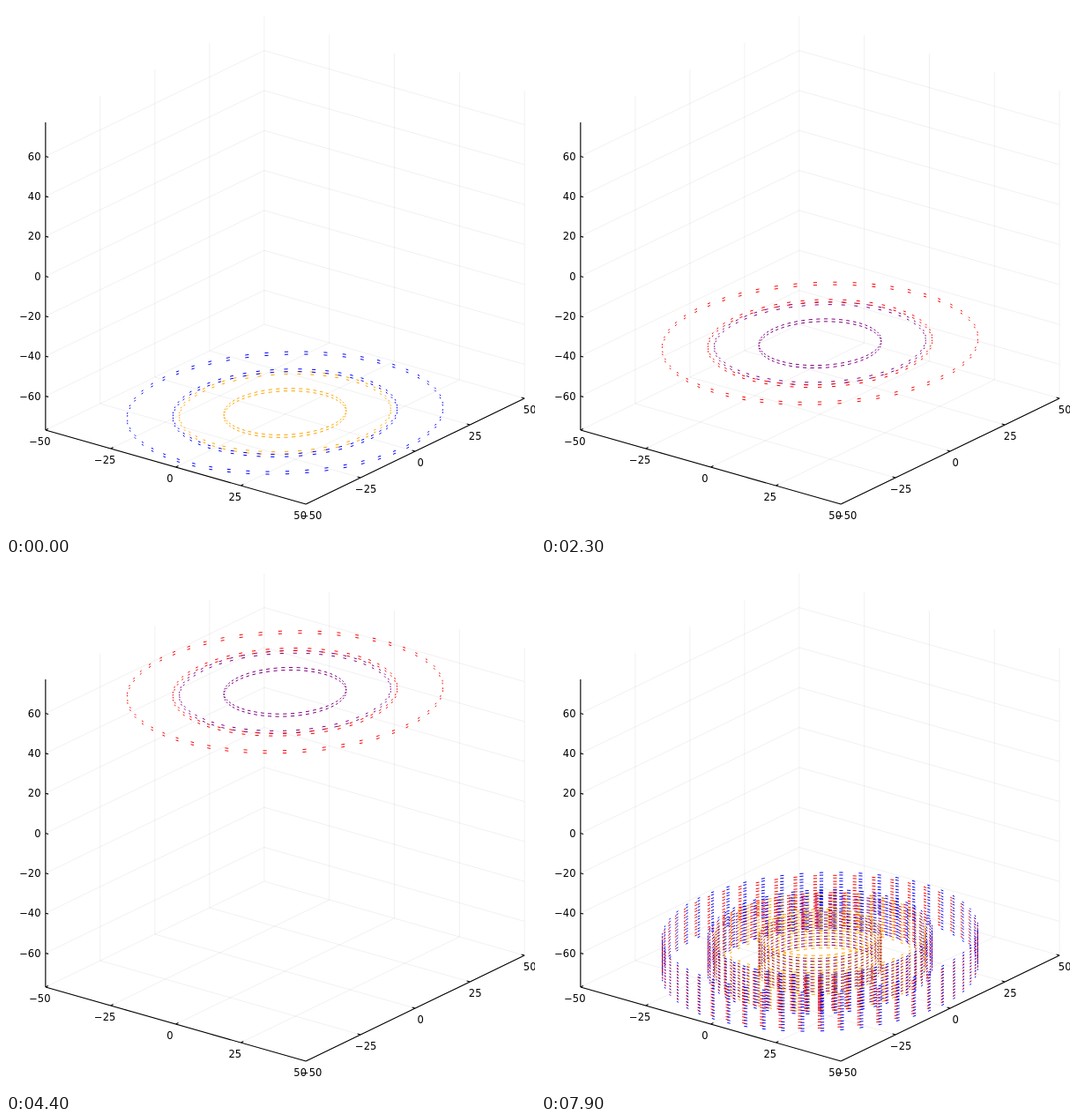
Write an HTML page that moves like this. It is 600x600 px and loops after 8000 ms.

```html
<!DOCTYPE html>
<html lang="en">
<head>
<meta charset="utf-8">
<title>Ring slices</title>
<style>
  html, body { margin: 0; width: 100%; height: 100%; overflow: hidden; background: #fff; }
  svg { display: block; width: 600px; height: 600px; }
  text { font: 11.5px "DejaVu Sans", sans-serif; fill: #000; }
  path { fill: none; }
</style>
</head>
<body>
<svg viewBox="0 0 600 600">
  <path id="grid" stroke="#000" stroke-opacity=".1" stroke-width=".6"/>
  <path id="axes" stroke="#000" stroke-width="1.1"/>
  <g id="labels"></g>
  <g id="rings"></g>
</svg>
<script>
const FRAME_MS = 100, FRAMES = 80, SWEEP = 27;
const COUNT = 50, STEP = 2 * Math.PI / COUNT;
const FLOOR = -77, PITCH = 1.512, HEIGHT = 1.3, WIDTH = 1.1, UPPER_SLICE = 75;
const VIEW = 0.699;
const el = id => document.getElementById(id);

const project = (x, y, z) => [
  316.5 + 2.953 * x + 2.48 * y,
  463 + 0.84 * x - 1.2 * y - 2.266 * (z - FLOOR)
];
const point = (...p) => project(...p).map(v => v.toFixed(2)).join(" ");
const line = (a, b) => `M${point(...a)}L${point(...b)}`;

function drawAxes() {
  let grid = "", axes = "", labels = "";
  const label = (x, y, value, anchor) => {
    labels += `<text x="${x}" y="${y}" text-anchor="${anchor}">${String(value).replace("-", "\u2212")}</text>`;
  };
  for (let v = -50; v <= 50; v += 25) {
    grid += line([v, 50, FLOOR], [v, 50, 77]) + line([v, -50, FLOOR], [v, 50, FLOOR]);
    grid += line([-50, v, FLOOR], [50, v, FLOOR]);
    if (v < 50) grid += line([-50, v, FLOOR], [-50, v, 77]);
    axes += line([v, -50, FLOOR], [v, -48.8, FLOOR]) + line([50, v, FLOOR], [48.8, v, FLOOR]);
    const [px, py] = project(v, -50, FLOOR), [qx, qy] = project(50, v, FLOOR);
    label(px - 6.5, py + 16.5, v, "middle");
    label(qx + 6, qy + 16.5, v, "middle");
  }
  for (let z = -60; z <= 60; z += 20) {
    grid += line([-50, -50, z], [-50, 50, z]) + line([-50, 50, z], [50, 50, z]);
    axes += line([-50, -50, z], [-48.9, -50, z]);
    label(39.5, project(-50, -50, z)[1] + 4.2, z, "end");
  }
  axes += line([-50, -50, 77], [-50, -50, FLOOR]) +
    line([-50, -50, FLOOR], [50, -50, FLOOR]) + line([50, -50, FLOOR], [50, 50, FLOOR]);
  el("grid").setAttribute("d", grid);
  el("axes").setAttribute("d", axes);
  el("labels").innerHTML = labels;
}

// Each element is the bottom and top edge of a small face, tangent to its ring.
function ringPath(radius, z, phase, lean) {
  let d = "";
  for (let k = 0; k < COUNT; k++) {
    const base = STEP * (k + phase);
    const angle = base + lean * STEP * Math.sin(base) + VIEW;
    const c = Math.cos(angle), s = Math.sin(angle), w = WIDTH / 2;
    for (const h of [z, z + HEIGHT])
      d += line([radius * c - w * s, radius * s + w * c, h], [radius * c + w * s, radius * s - w * c, h]);
  }
  return d;
}

const cache = {};
function layer(index, outer, upper) {
  const key = [index, outer, upper].join();
  if (!cache[key]) {
    const odd = index % 2;
    const color = outer ? (odd ? "#f00" : "#00f") : (odd ? "#800080" : "#ffa500");
    const [phase, lean] = odd ? [0.61, 0.134] : upper ? [0.5, 0.11] : [0.52, -0.09];
    const z = FLOOR + PITCH * (index + (upper ? UPPER_SLICE : 0));
    const d = (outer ? [33, 46.45] : [18, 31.1]).map(r => ringPath(r, z, phase, lean)).join("");
    cache[key] = `<path stroke="${color}" d="${d}"/>`;
  }
  return cache[key];
}

function ringsAt(frame) {
  if (frame < 2 * SWEEP) {
    const upper = frame >= SWEEP, index = frame % SWEEP;
    return layer(index, false, upper) + layer(index, true, upper);
  }
  let stack = "";
  for (let j = 0; j <= frame - 2 * SWEEP; j++) stack += layer(j >> 1, j % 2 === 1, false);
  return stack;
}

let shown = -1;
const start = performance.now();
function update(now) {
  const frame = Math.floor(Math.max(0, now - start) / FRAME_MS) % FRAMES;
  if (frame !== shown) {
    el("rings").innerHTML = ringsAt(frame);
    shown = frame;
  }
  requestAnimationFrame(update);
}
drawAxes();
update(start);
</script>
</body>
</html>
```
